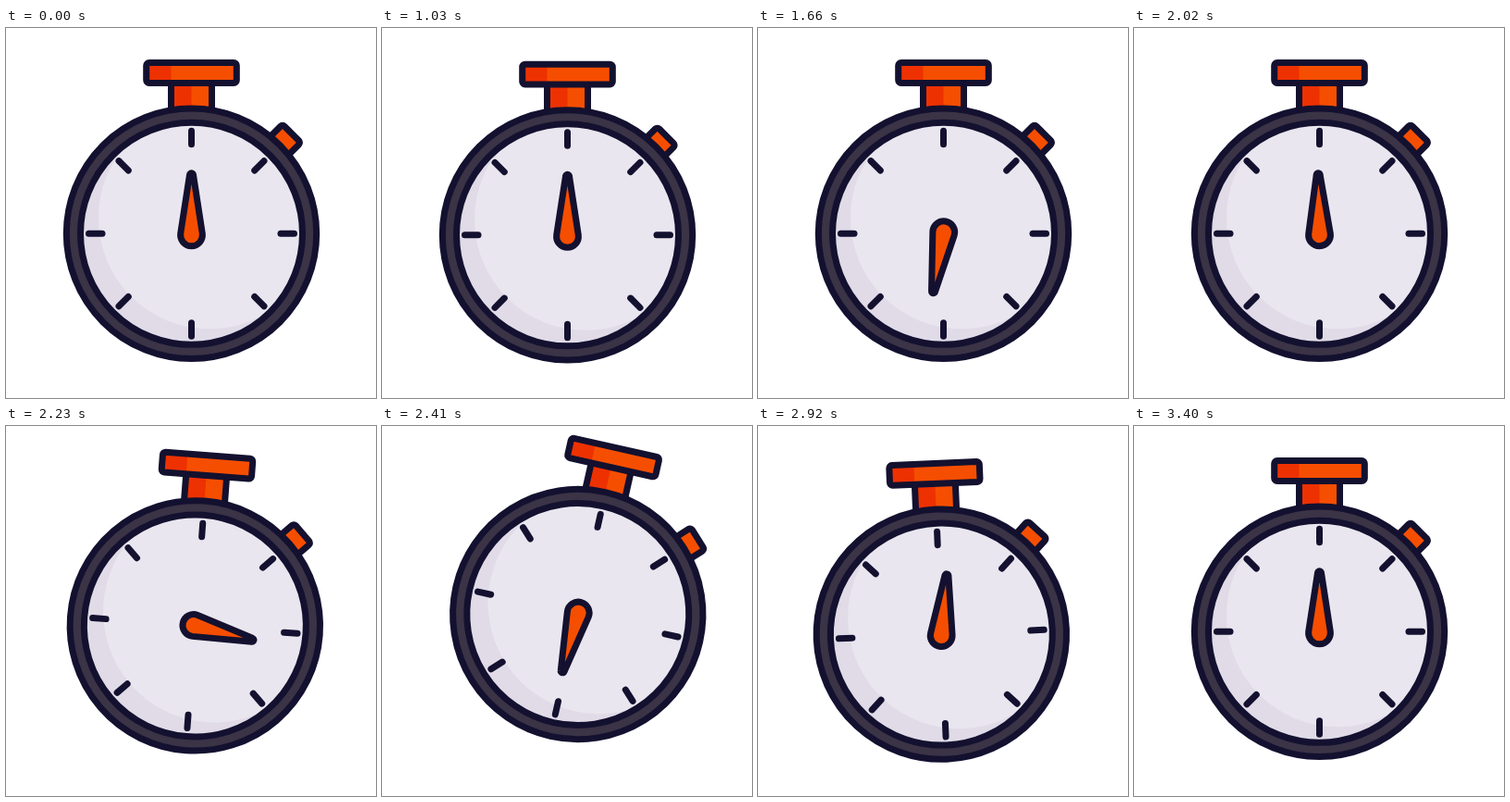
Recreate the animation shown at these times as an HTML page. Size 400 by 400 pixels, loop 3.43 s.

```html
<!DOCTYPE html>
<html lang="en">
<head>
<meta charset="utf-8">
<title>Stopwatch</title>
<style>
  html, body { margin: 0; height: 100%; overflow: hidden; background: #fff; }
  svg { display: block; width: 100vw; height: 100vh; }
  .line { stroke: #13112f; stroke-width: 7; stroke-linecap: round; stroke-linejoin: round; }
  .orange { fill: #f64e00; }
  .red { fill: #ee3100; }
</style>
</head>
<body>
<svg viewBox="0 0 400 400">
  <clipPath id="face"><circle r="120"/></clipPath>
  <g id="watch">
    <g id="button">
      <rect class="line orange" x="-14" y="-153.2" width="28" height="30" rx="3"/>
    </g>
    <rect class="orange" x="-22" y="-162" width="44" height="32"/>
    <rect class="red" x="-22" y="-162" width="22" height="32"/>
    <path class="line" fill="none" d="M-22-162V-130M22-162V-130"/>
    <rect class="orange" x="-48.8" y="-184.7" width="97.6" height="21.8" rx="3"/>
    <rect class="red" x="-48.8" y="-184.7" width="26.8" height="21.8" rx="3"/>
    <rect class="line" fill="none" x="-48.8" y="-184.7" width="97.6" height="21.8" rx="3"/>
    <circle class="line" r="135.2" fill="#3b3346"/>
    <circle r="120" fill="#e0dbe7"/>
    <circle cx="19.5" cy="-17" r="120" fill="#eae6ef" clip-path="url(#face)"/>
    <circle class="line" r="120" fill="none"/>
    <g id="ticks" class="line"></g>
    <path id="hand" class="line orange" d="M-2-63.5L-11.8 0A11.9 11.9 0 1 0 11.8 0L2-63.5A2 2 0 0 0-2-63.5Z"/>
  </g>
</svg>
<script>
const LOOP = 3430, STEP = 30, PAUSE = 1000;
const $ = id => document.getElementById(id);

for (let a = 0; a < 360; a += 45)
  $('ticks').innerHTML += `<path d="M0-111V-96.5" transform="rotate(${a})"/>`;

const ramp = (k, from, to) => Math.min(1, Math.max(0, (k - from) / (to - from)));
const ease = (k, from, to) => {
  const u = ramp(k, from, to);
  return u * u * (3 - 2 * u);
};

// Goes from rest to a, swings past to b, and comes back to rest.
const swing = (k, a, b, [t0, t1, t2, t3]) =>
  a * ease(k, t0, t1) + (b - a) * ease(k, t1, t2) - b * ease(k, t2, t3);

const PRESS = [0, 4, 9, 14], LEAN = [36, 49.5, 64, 72], HOP = [36, 49.5, 68, 74];

function draw(now) {
  const k = Math.max(0, Math.floor((now % LOOP - PAUSE) / STEP));

  const lean = swing(k, 1, -0.175, LEAN);
  const landing = -4 * (ease(k, 68, 74) - ease(k, 74, 80));
  const y = swing(k, 10, -6.5, PRESS) + swing(k, -20.6, 6, HOP) + landing;
  const press = swing(k, 12, -2.5, PRESS);

  // Two turns with soft ends, a little too far, then back to the top.
  const turn = 0.6 * ramp(k, 4.2, 65) + 0.4 * ease(k, 4.2, 65);
  const hand = 735 * turn - 15 * ease(k, 65, 78);

  $('watch').setAttribute('transform',
    `translate(${200.5 + 12.4 * lean} ${222.3 + y}) rotate(${14 * lean})`);
  $('button').setAttribute('transform', `rotate(45) translate(0 ${press})`);
  $('hand').setAttribute('transform', `rotate(${hand})`);
}

let start;
function tick(now) {
  start ??= now;
  draw(now - start);
  requestAnimationFrame(tick);
}
draw(0);
requestAnimationFrame(tick);
</script>
</body>
</html>
```
